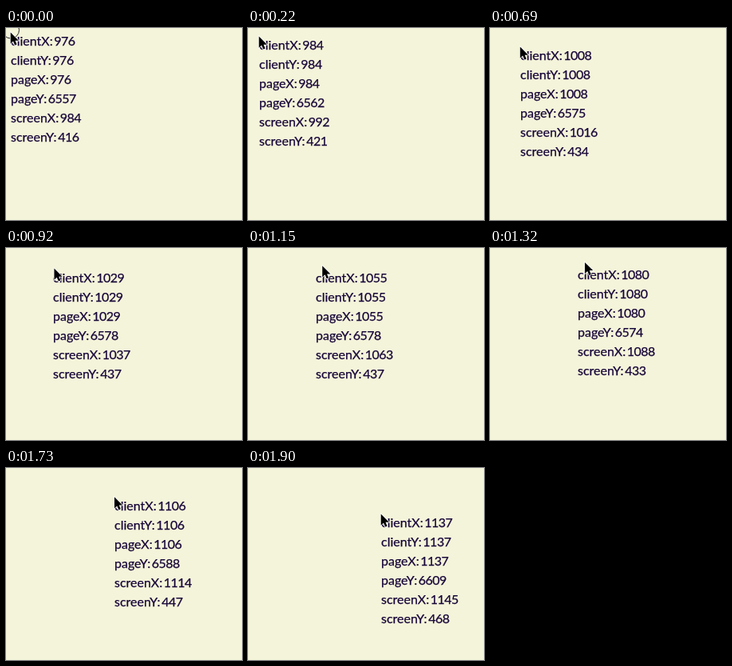
Write an HTML page that moves like this. It is 296 px wide and 240 px high and loops after 2 s.

```html
<!DOCTYPE html>
<html lang="en">
<head>
<meta charset="utf-8">
<title>Mouse coordinates</title>
<style>
  html, body { margin: 0; width: 100%; height: 100%; overflow: hidden; background: #f4f4da; }
  svg { display: block; width: 296px; height: 240px; }
  text { font: 16px Lato, sans-serif; word-spacing: -2.5px; fill: #170538; stroke: #170538; stroke-width: .25px; }
  tspan { letter-spacing: -.5px; }
</style>
</head>
<body>
<svg viewBox="0 0 296 240">
  <g id="readout"></g>
  <circle id="ring" cx="6" cy="2.5" r="10.5" fill="none" stroke="#222"/>
  <path id="pointer" d="M0 0V14.2L3.3 11.1L5.4 16L7.9 15L5.8 10.2H10.2Z"
        stroke="#fff" stroke-width="1.4" paint-order="stroke"/>
</svg>
<script>
const LOOP = 2000, STEP = 57.75, LAG = 3;
const PAUSE = 1320, RESUME = 1550;
const LINE = 24;
const $ = id => document.getElementById(id);

// Key points of the label
const path = [
  { t: 0, x: 6, y: 16 },
  { t: 450, x: 23, y: 27 },
  { t: 690, x: 38, y: 34 },
  { t: 920, x: 59, y: 37 },
  { t: 1150, x: 85, y: 37 },
  { t: 1320, x: 110, y: 33 },
  { t: 1560, x: 114, y: 32 },
  { t: 1900, x: 167, y: 68 }
];
const last = path.length - 1;

// The picture refreshes at a steady rate, on a 10 ms clock, and rests once
function refreshTime(time) {
  const n = Math.floor((time + LAG) / STEP + 0.17);
  const tick = k => Math.max(0, Math.floor((k * STEP - LAG) / 10) * 10);
  const t = Math.min(1900, tick(tick(n) <= time ? n : n - 1));
  return t > PAUSE && t < RESUME ? PAUSE : t;
}

function slope(i, axis) {
  const a = path[Math.max(0, i - 1)], b = path[Math.min(last, i + 1)];
  return (b[axis] - a[axis]) / (b.t - a.t);
}

// Smooth curve through the key points
function at(t, axis) {
  const i = Math.min(last - 1, path.findLastIndex(p => p.t <= t));
  const p = path[i], q = path[i + 1];
  const d = q.t - p.t, u = (t - p.t) / d, v = 1 - u;
  return p[axis] * v * v * (1 + 2 * u) + q[axis] * u * u * (3 - 2 * u)
    + d * u * v * (v * slope(i, axis) - u * slope(i + 1, axis));
}

const names = ['clientX', 'clientY', 'pageX', 'pageY', 'screenX', 'screenY'];
$('readout').innerHTML = names.map(name => `<text>${name}: <tspan></tspan></text>`).join('');
const rows = [...$('readout').children];

function draw(time) {
  const t = refreshTime(time % LOOP);
  const x = Math.round(at(t, 'x')), y = Math.round(at(t, 'y'));
  const client = x + 970;
  const values = [client, client, client, y + 6541, client + 8, y + 400];
  rows.forEach((row, i) => {
    row.lastChild.textContent = values[i];
    row.setAttribute('x', x);
    row.setAttribute('y', y + 6 + i * LINE);
  });

  // The pointer runs ahead of the label around the top of the arc
  const lead = Math.exp(-(((t - 1250) / 250) ** 2));
  $('pointer').setAttribute('transform', `translate(${x - 0.3 + 10 * lead} ${y - 10.5 - 5 * lead})`);
  $('ring').style.display = t === 0 ? '' : 'none';
}

const start = performance.now();
function frame() {
  draw(performance.now() - start);
  requestAnimationFrame(frame);
}
frame();
</script>
</body>
</html>
```
